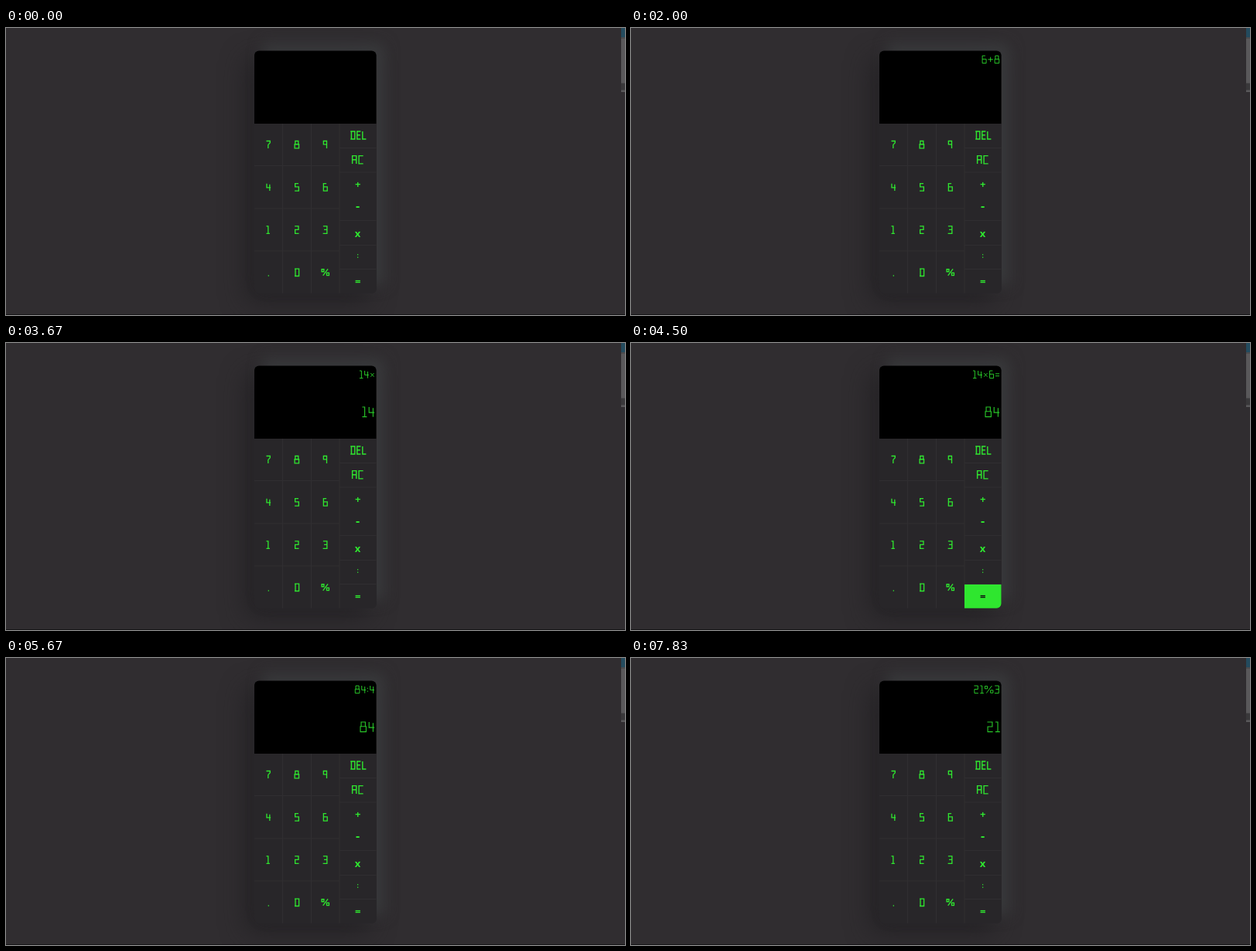
These frames come from a looping animation (800x372 px, 8000 ms). An HTML page:

```html
<!DOCTYPE html>
<html lang="en">
<head>
<meta charset="utf-8">
<title>Calculator</title>
<style>
  html, body { margin: 0; width: 100%; height: 100%; overflow: hidden; background: #302d30; }
  #stage { position: relative; width: 800px; height: 372px; overflow: hidden; }
  #stage::after { content: ""; position: absolute; left: 0; right: 0; bottom: 0; height: 1px; background: #151416; }
  #card {
    position: absolute; left: 321px; top: 29.5px; width: 157.5px; height: 314.3px; border-radius: 6px;
    background: #282629;
    box-shadow: 10px -10px 18px #393a3c, -10px 10px 32px #232124;
  }
  #side {
    position: absolute; left: 794.5px; top: 0; width: 6px; height: 83px;
    background: linear-gradient(#234b5e 12px, #4b4a4c 12px 14px, #59585a 14px 71px, #39383a 72px 80px, #59585a 81px);
  }
  svg { position: absolute; inset: 0; }
  path { fill: none; stroke: currentColor; vector-effect: non-scaling-stroke; }
  text { fill: currentColor; font: 600 13px "Noto Sans", "Open Sans", sans-serif; text-anchor: middle; }
  #calc { color: #2fe62f; }
  .grid { color: #302e31; stroke-width: 1; }
  .flash { opacity: 0; }
</style>
</head>
<body>
<div id="stage">
  <div id="card"></div>
  <div id="side"></div>
  <svg id="calc" width="800" height="372" viewBox="0 0 800 372">
    <clipPath id="body"><rect x="321" y="29.5" width="157.5" height="314.3" rx="6"/></clipPath>
    <g clip-path="url(#body)">
      <rect x="321" y="29" width="158" height="95" fill="#000"/>
      <path class="grid" d="M357.5 124V344M394.5 124V344M431 124V344M321 178.5H431M321 234H431M321 289H431M431 155.5H479M431 187H479M431 249.5H479M431 281.5H479M431 312.5H479"/>
      <g id="keys"></g>
    </g>
    <g id="display"></g>
  </svg>
</div>
<script>
const LOOP = 8000;
const GREEN = '#2fe62f';

// Stroke font on a 6 x 10 box: [advance, path].
const FONT = {
  0: [8.2, 'M.3 0H6V10H.3ZM1.8 8L4.5 2'],
  1: [6.4, 'M.3 0H2.8V10M.3 10H5'],
  2: [8.2, 'M.3 0H5.4V4.7H.8V10H6'],
  3: [8.2, 'M.3 0H5.6V10H0M1.5 4.7H5.6'],
  4: [8.2, 'M.8 0V5.6H6.3M4.9 1V10'],
  5: [8.2, 'M5.4 0H.8V4.5H5.8V10H.2'],
  6: [8.2, 'M4.8 0H.8V10H6V4.5H.8'],
  7: [8.2, 'M.3 0H5.4V2.4L2.8 5.2V10'],
  8: [8.2, 'M.2 4.5V10H6V4.5ZM1 4.5V0H5.2V4.5'],
  9: [8.2, 'M5.2 10V0H.8V4.7H5.2'],
  '+': [9.1, 'M.2 5H7M3.6 1.7V8.3'],
  '×': [7.4, 'M.6 3.2L5 8M5 3.2L.6 8'],
  ':': [3.2, 'M.6 2.8V4.2M.6 6.8V8.2'],
  '=': [7.4, 'M.3 4H5.6M.3 7H5.6'],
  '%': [13.3, 'M.3 .5H3.6V4H.3ZM9.6 0L2.2 10M7.8 6H11.2V9.6H7.8Z'],
  D: [8, 'M0 0H5.6V10H0M1.2 0V10'],
  E: [7, 'M5.2 0H.6V10H5.2M.6 4.8H4.6'],
  L: [6, 'M.6 0V10H5.2'],
  A: [8.2, 'M.6 10V0H5.6V10M.6 5H5.6'],
  C: [7, 'M6 0H.6V10H6'],
};

const el = (tag, attrs, parent) => {
  const node = document.createElementNS('http://www.w3.org/2000/svg', tag);
  for (const name in attrs) node.setAttribute(name, attrs[name]);
  return parent.appendChild(node);
};

const widthOf = str => [...str].reduce((sum, ch) => sum + FONT[ch][0], 0);

function strokeText(parent, str, x, y, scale, weight) {
  const group = el('g', { role: 'img', 'aria-label': str, 'stroke-width': weight }, parent);
  for (const ch of str) {
    const [advance, d] = FONT[ch];
    el('path', { d, transform: `translate(${x} ${y}) scale(${scale})` }, group);
    x += advance * scale;
  }
  return group;
}

function showBetween(node, from, to) {
  const a = from / LOOP, b = to / LOOP;
  node.animate([
    { opacity: 0, offset: 0 }, { opacity: 0, offset: a },
    { opacity: 1, offset: a }, { opacity: 1, offset: b },
    { opacity: 0, offset: b }, { opacity: 0, offset: 1 },
  ], { duration: LOOP, iterations: Infinity });
}

const keys = document.getElementById('keys');
const display = document.getElementById('display');
const labels = {};

function addKey(name, draw) {
  labels[name] = draw;
  draw(keys);
}

// Number pad
['789', '456', '123', '.0%'].forEach((row, r) => [...row].forEach((ch, c) => {
  const x = 339.2 + 36.7 * c, y = 151.2 + 55.2 * r;
  addKey(ch, parent => {
    if (ch === '.') el('rect', { x: x - .5, y: y + 3.5, width: 1.2, height: 1.5, fill: 'currentColor' }, parent);
    else if (ch === '0') el('path', { d: 'M0 0H5.6V9.4H0M1 0V9.4', transform: `translate(${x - 2.9} ${y - 4.7})`, 'stroke-width': 1.3 }, parent);
    else if (ch === '%') strokeText(parent, ch, x - 4.8, y - 4.5, .86, 1.3);
    else strokeText(parent, ch, x - 3, y - 4.7, .94, 1.3);
  });
}));

// Command column
addKey('DEL', parent => strokeText(parent, 'DEL', 445.2, 134, 1, 1.4));
addKey('AC', parent => strokeText(parent, 'AC', 447, 165.6, 1.03, 1.4));
[['+', 206.6, 13], ['-', 236, 16], ['x', 270.5, 13], [':', 298.4, 8], ['=', 332.6, 13]].forEach(([ch, y, size]) =>
  addKey(ch, parent => {
    el('text', { x: 454.6, y, style: `font-size:${size}px` }, parent).textContent = ch;
  }));

// Pressed keys: name, start, end, x, y, width, height
[
  ['8', 1920, 2000, 358, 124.5, 36.5, 54],
  ['=', 2500, 2580, 431, 313, 48, 31],
  ['=', 4500, 4580, 431, 313, 48, 31],
  ['4', 5580, 5670, 321, 179, 36.5, 55],
  ['%', 7250, 7330, 395, 289.5, 35.8, 54.5],
].forEach(([name, from, to, x, y, width, height]) => {
  const flash = el('g', { class: 'flash', color: '#111' }, keys);
  el('rect', { x, y, width, height, fill: GREEN }, flash);
  labels[name](flash);
  showBetween(flash, from, to);
});

function addReadout(states, right, y, scale, weight) {
  states.forEach(([from, str], i) => {
    const to = i + 1 < states.length ? states[i + 1][0] : LOOP;
    const zero = str === '0';
    const node = strokeText(display, str, right - widthOf(str) * scale, y, scale, zero ? weight + .25 : weight);
    node.setAttribute('stroke-opacity', zero ? 1 : .85);
    showBetween(node, from, to);
  });
}

addReadout([
  [0, '0'], [1330, '6'], [1670, '6+'], [1920, '6+8'], [2500, '6+8='],
  [3670, '14×'], [4000, '14×6'], [4500, '14×6='],
  [5330, '84:'], [5580, '84:4'], [6330, '84:4='],
  [7250, '21%'], [7830, '21%3'],
], 477.8, 36, .96, 1);

addReadout([[0, '0'], [2500, '14'], [4500, '84'], [6330, '21']], 478.6, 83, 1.27, 1.15);
</script>
</body>
</html>
```
